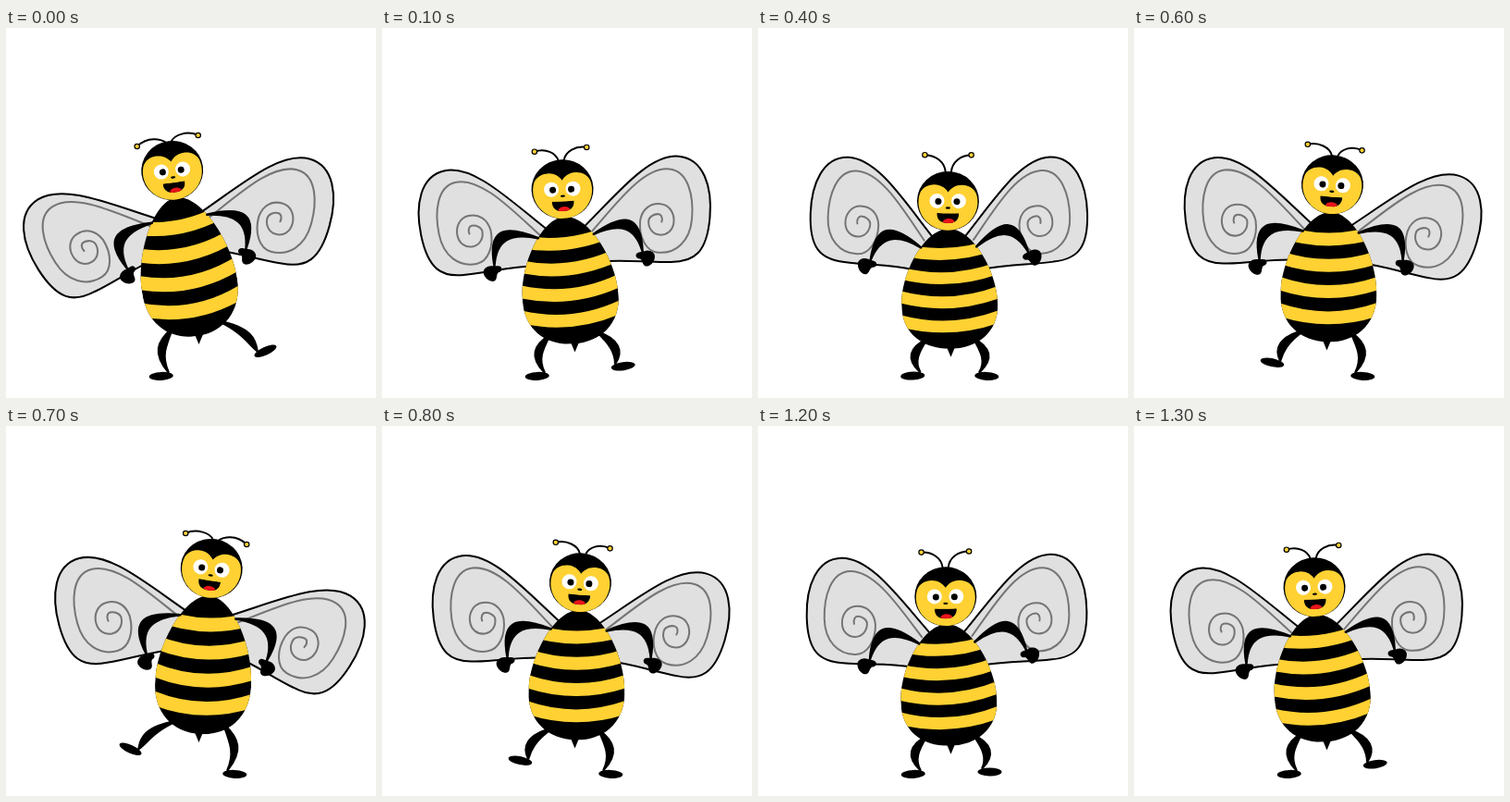
An HTML page for the animation above (1.4 s loop, 400x400 px).

```html
<!DOCTYPE html>
<html lang="en">
<head>
<meta charset="utf-8">
<title>Dancing bee</title>
<style>
  html, body { margin: 0; width: 100%; height: 100%; overflow: hidden; background: #fff; }
  svg { display: block; width: 100%; height: 100%; }
</style>
</head>
<body>
<svg viewBox="0 0 400 400">
  <defs>
    <clipPath id="egg"><path d="M0-131C-26-131-52-84-52-48C-52-16-28 0 0 0C28 0 52-16 52-48C52-84 26-131 0-131Z"/></clipPath>
    <clipPath id="lips"><path d="M-12 13Q0 14 12 13C12 21 7 24 0 24C-7 24-12 21-12 13Z"/></clipPath>
    <g id="wing" fill="none" stroke-width="2" stroke-linecap="round">
      <path fill="#e0e0e0" stroke="#000"
        d="M8-10C-28-52-58-99-91-99.500C-118-99.500-130-70-130-37C-130 0-118 12-92 14C-65 17-45 15-17 20L10 20"/>
      <path stroke="#757575"
        d="M-6-12C-30-45-55-85-82-85C-103-85-111-58-111-34C-111-10-97 5-78 5C-65 5-56-10-56-27C-57-40-65-47-76-47C-86-47-92-38-92-29C-92-20-86-14-78-14C-70-14-65-21-65-28C-65-32-70-36-75-36C-78-36-80-32-79-28"/>
    </g>
    <g id="arm">
      <path stroke="#000" stroke-width="2.500" stroke-linejoin="round" d="M0 0C25-35 42-35 56 0C40-22 23-22 0 0Z"/>
      <path transform="translate(56 0) rotate(-22)" d="M2 0C8-2 14 2 13 7C12 14 5 18 2 16C-1 14 0 10-3 8C-8 8-9 2-4 1Z"/>
    </g>
    <ellipse id="foot" cx="8" cy="4" rx="13" ry="4.500"/>
    <path id="sting" d="M-5-3H5L0 9Z"/>
    <g id="head">
      <ellipse rx="33.500" ry="32"/>
      <path fill="#ffd133" d="M0-9.500C3-14 8-17.500 15-17.500C22-17.500 28-14 30.500-8A32 30.500 0 1 1-30.500-8C-28-14-22-17.500-15-17.500C-8-17.500-3-14 0-9.500Z"/>
      <g fill="#fff"><circle cx="-12" r="8"/><circle cx="11.500" r="8"/></g>
      <circle cx="-10.500" cy=".5" r="3.500"/><circle cx="9.500" cy=".5" r="3.500"/>
      <ellipse cy="7.500" rx="2.600" ry="1.200"/>
      <g clip-path="url(#lips)">
        <rect x="-14" y="10" width="28" height="16"/>
        <ellipse cx="1" cy="23" rx="6.500" ry="4" fill="#e8141a"/>
      </g>
    </g>
    <g id="body" clip-path="url(#egg)">
      <rect x="-60" y="-135" width="120" height="140"/>
      <g id="stripes" fill="none" stroke="#ffd133" stroke-width="13" transform="translate(0 -1) rotate(-1.500)"></g>
    </g>
  </defs>
  <g id="bee"></g>
</svg>
<script>
const STEP = 100, HALF = 7, MIDDLE = 3.35;
const DEG = 180 / Math.PI;
const byId = id => document.getElementById(id);

const use = (id, x, y, deg = 0, sx = 1, sy = 1) =>
  `<use href="#${id}" transform="translate(${x} ${y}) rotate(${deg}) scale(${sx} ${sy})"/>`;

function spin(x, y, deg) {
  const c = Math.cos(deg / DEG), s = Math.sin(deg / DEG);
  return [x * c - y * s, x * s + y * c];
}

// Sway from -1 (far left) through a slow middle to 1 (far right).
function swayAt(step) {
  const d = (HALF - Math.abs(HALF - step) - MIDDLE) / MIDDLE;
  return Math.sign(d) * Math.min(1, Math.abs(d) ** 2.6);
}

function leg(side, [x, y], reach) {
  const fx = 207.5 + side * (32 + 32 * reach), fy = 372 - 23 * reach;
  const mx = (x + fx) / 2, my = (y + fy) / 2;
  const tilt = side * (3 - 28 * reach);
  return `<path stroke="#000" stroke-width="2.500" stroke-linejoin="round"
    d="M${x} ${y}C${mx + side * 15} ${my - 9} ${mx + side * 19} ${my + 4} ${fx} ${fy}C${mx + side * 10} ${my + 7} ${mx + side * 6} ${my - 3} ${x} ${y}Z"/>` +
    use('foot', fx, fy, tilt, side);
}

function antenna(side, hx, hy, tilt, drop, toward) {
  const [dx, dy] = spin(3 * side, -31, tilt);
  const bx = hx + dx, by = hy + dy;
  const x = hx + side * (25 + 8 * drop + 5 * toward), y = hy - 50 + 18 * drop + 6 * toward;
  const rise = by - y, droop = 18 - rise;
  return `<path fill="none" stroke="#000" stroke-width="2"
    d="M${bx} ${by}C${bx + side * (1 + droop * .2)} ${by - 5 - rise * .33} ${x - side * 12} ${y - droop * .5} ${x} ${y}"/>
    <circle cx="${x}" cy="${y}" r="2.700" fill="#ffd133" stroke="#000" stroke-width="1.200"/>`;
}

function draw(step) {
  const sway = swayAt(step), lift = Math.abs(sway);
  const hx = 205.2 + sway * (sway < 0 ? 25.5 : 17), hy = 187.5 - 33.5 * lift;
  const bx = 208 + 1.2 * sway, by = 347 - 14 * lift;
  const tilt = .5 + 8 * sway;

  // The body stretches between tail and head.
  const lean = Math.atan2(hx - bx, by - hy) * DEG;
  const tall = (Math.hypot(hx - bx, by - hy) - 32) / 129;
  const soft = 1 + (tall - 1) * .6, size = 1 + (tall - 1) * .2;
  const on = (x, y) => {
    const [dx, dy] = spin(x, y, lean);
    return [bx + dx, by + dy];
  };
  const both = part => part(-1) + part(1);

  byId('bee').innerHTML =
    both(s => use('wing', ...on(21 * s, -106 * soft), s * (26 * lift + 8.5 * s * sway - 2), -s * size, size)) +
    both(s => leg(s, on(25 * s, -11 * tall), Math.max(0, -s * sway))) +
    use('sting', 208.5, by) +
    use('body', bx, by, lean, 1, tall) +
    both(s => use('arm', ...on(30 * s, -111 * tall), s * (9 - 4 * s + 42 * lift + 6 * s * sway), s)) +
    both(s => antenna(s, hx, hy, tilt, lift, s * sway)) +
    use('head', hx, hy, tilt);
}

for (let i = 0; i < 4; i++) {
  const y = 26.4 * i - 102.5;
  byId('stripes').innerHTML += `<path d="M-58 ${y - 10}Q0 ${y + 10} 58 ${y - 10}"/>`;
}

let shown = -1;
function tick() {
  const step = Math.floor(performance.now() / STEP) % (2 * HALF);
  if (step !== shown) draw(shown = step);
  requestAnimationFrame(tick);
}
tick();
</script>
</body>
</html>
```
